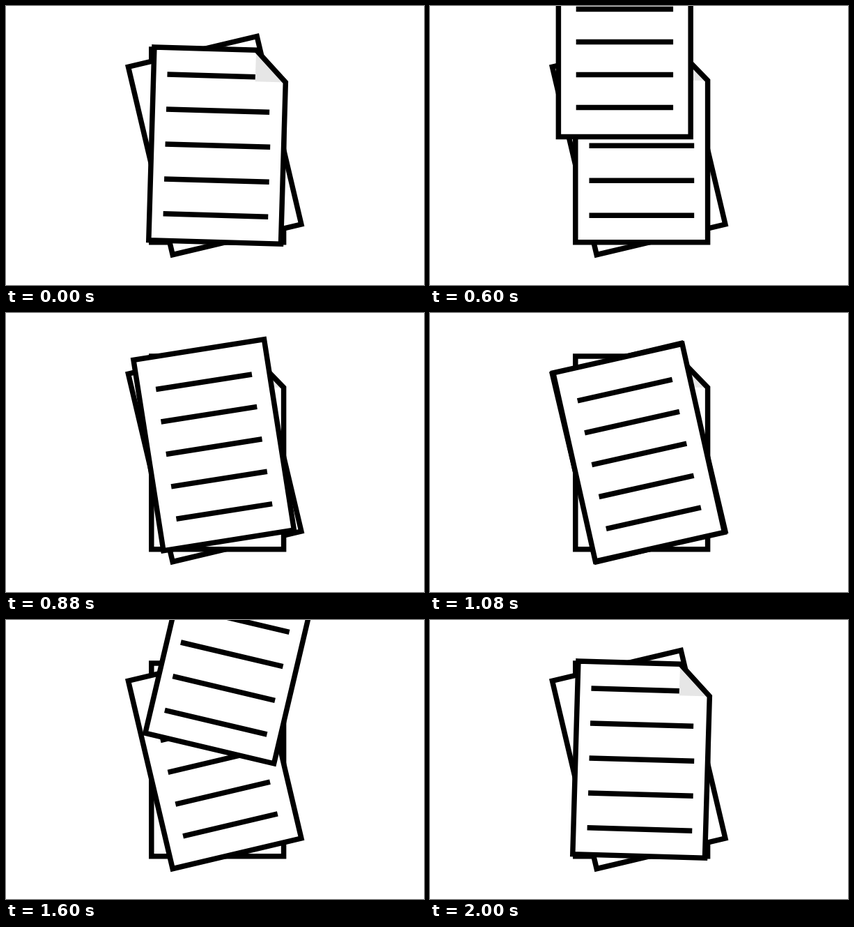
Write an HTML page with a canvas that moves like this. It is 600 px wide and 400 px high and loops after 2.04 s.

```html
<!DOCTYPE html>
<html lang="en">
<head>
<meta charset="utf-8">
<title>Stacking papers</title>
<style>
  html, body { margin: 0; width: 100%; height: 100%; overflow: hidden; background: #fff; }
  canvas { display: block; width: 600px; height: 400px; }
</style>
</head>
<body>
<canvas id="stage" width="600" height="400"></canvas>
<script>
const ctx = document.getElementById('stage').getContext('2d');

const LOOP = 2040, STEP = 40, CYCLE = 2000;
const HALF_W = 94.9, HALF_H = 138.4;
const DROP = 333, DRIFT = 45, TILT = 13.3;
const FALL_TIME = 590, TURN_START = 228, TURN_TIME = 590;

// side: direction from which the sheet drifts in
const folded = {
  x: 303.7, y: 200.3, angle: 0, side: 1, start: 1440, fold: true,
  left: -75.2, right: 75.5, firstLine: -100, gap: 50
};
const plain = {
  x: 299.7, y: 200.1, angle: -TILT, side: -1, start: 440, fold: false,
  left: -69.6, right: 69.8, firstLine: -91.6, gap: 47
};

function polygon(points) {
  ctx.beginPath();
  points.forEach(([x, y]) => ctx.lineTo(x, y));
  ctx.closePath();
}

function drawSheet(sheet, dx = 0, dy = 0, turn = 0) {
  const foldX = 51.5, foldY = -93.5;
  const corner = sheet.fold
    ? [[foldX, -HALF_H], [HALF_W, foldY]]
    : [[HALF_W, -HALF_H]];
  const outline = [[-HALF_W, -HALF_H], ...corner, [HALF_W, HALF_H], [-HALF_W, HALF_H]];

  ctx.save();
  ctx.translate(sheet.x + dx, sheet.y + dy);
  ctx.rotate((sheet.angle + turn) * Math.PI / 180);

  polygon(outline);
  ctx.fillStyle = '#fff';
  ctx.fill();

  ctx.lineWidth = 7.5;
  ctx.strokeStyle = '#000';
  ctx.beginPath();
  for (let i = 0; i < 5; i++) {
    const y = sheet.firstLine + i * sheet.gap;
    const right = sheet.fold && i < 2 ? [foldX, 73][i] : sheet.right;
    ctx.moveTo(sheet.left, y);
    ctx.lineTo(right, y);
  }
  ctx.stroke();

  if (sheet.fold) {
    polygon([...corner, [foldX - 0.4, foldY]]);
    ctx.fillStyle = '#e6e6e6';
    ctx.fill();
  }

  polygon(outline);
  ctx.stroke();
  ctx.restore();
}

// Share of the way still to go, easing out.
const remaining = (t, duration) =>
  Math.pow(Math.max(0, 1 - t / duration), 2.5);

function render(ms) {
  const t = Math.floor((ms % LOOP) / STEP) * STEP % CYCLE;
  const plainFalls = t >= plain.start && t < folded.start;
  const [top, other] = plainFalls ? [plain, folded] : [folded, plain];
  const phase = (t - top.start + CYCLE) % CYCLE;
  const fall = remaining(phase, FALL_TIME);
  const turn = remaining(Math.max(0, phase - TURN_START), TURN_TIME);

  ctx.fillStyle = '#fff';
  ctx.fillRect(0, 0, 600, 400);
  drawSheet(top);
  drawSheet(other);
  drawSheet(top, top.side * DRIFT * fall, -DROP * fall, TILT * turn);
}

let begin = null;
function tick(now) {
  if (begin === null) begin = now;
  render(now - begin);
  requestAnimationFrame(tick);
}
render(0);
requestAnimationFrame(tick);
</script>
</body>
</html>
```
